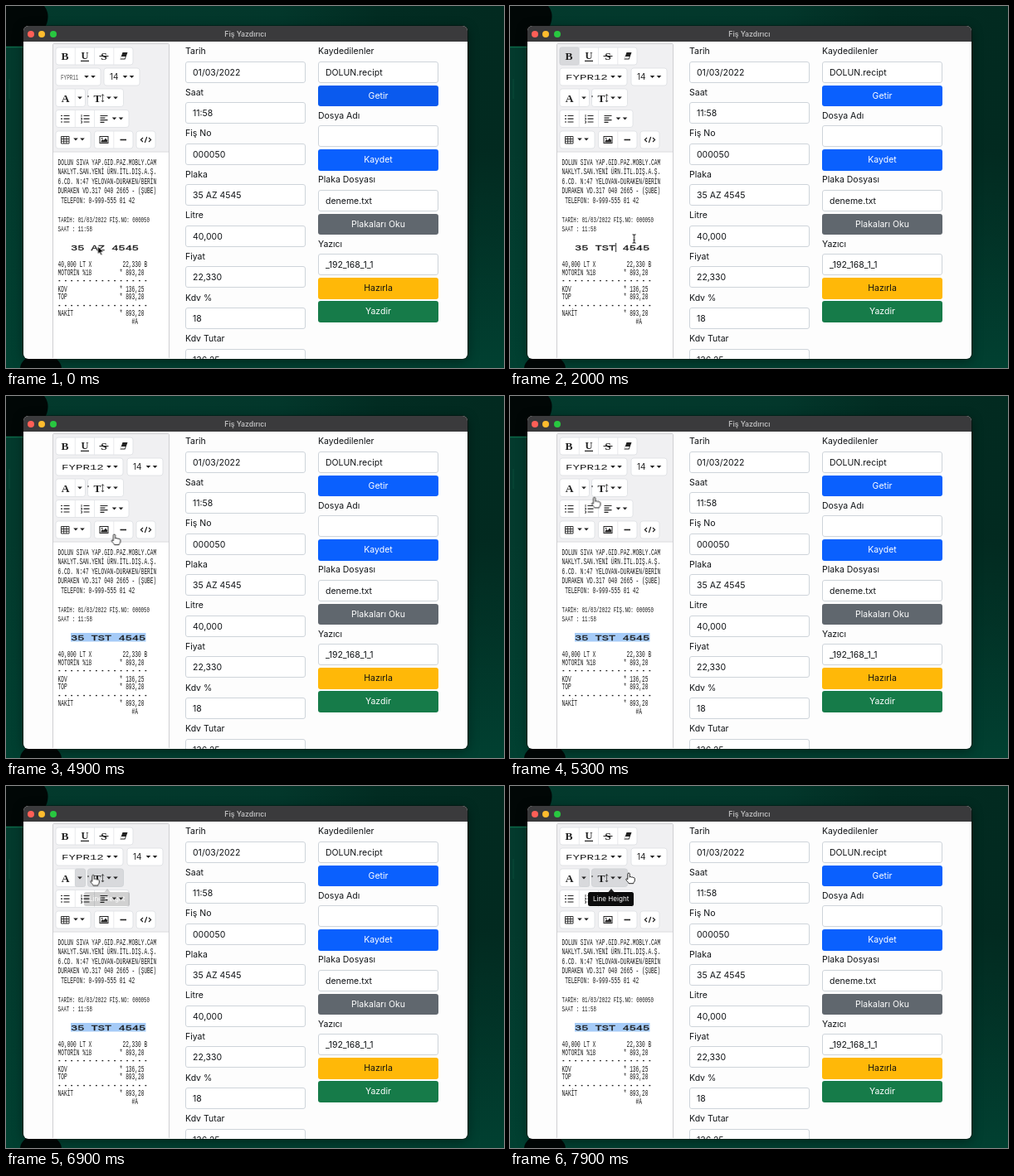
An HTML page for the animation above (8 s loop, 600 by 437 pixels).

```html
<!DOCTYPE html>
<html lang="tr">
<head>
<meta charset="utf-8">
<title>Fiş Yazdırıcı</title>
<style>
html, body { margin: 0; width: 100%; height: 100%; overflow: hidden; background: #01281f; }
body { position: relative; font: 10.5px/16px Inter, Roboto, sans-serif; color: #101316; }
svg { position: absolute; left: 0; top: 0; }

/* window and form */
.win { position: absolute; left: 21px; top: 24px; width: 535px; height: 401.5px; overflow: hidden;
  border-radius: 6px; background: #fdfdfd; box-shadow: 0 0 0 .6px #0009, 0 3px 14px #0006; }
.bar { height: 19px; line-height: 20px; text-align: center; background: #3a3a3c; color: #b9b9ba; font-size: 8.7px; font-weight: 600; }
.bar i { position: absolute; top: 5.8px; width: 8px; height: 8px; border-radius: 50%; }
.col { position: absolute; top: 22px; width: 145px; }
.col p { margin: 0; height: 20.5px; line-height: 17px; }
.in, .btn { box-sizing: border-box; border-radius: 3px; }
.in { height: 26px; padding-left: 8px; line-height: 25px; border: 1px solid #ced4da; background: #fff; }
.a .in { margin-bottom: 3.1px; }
.gap { margin-bottom: 2.6px; }
.btn { height: 25.4px; margin-top: 2.6px; line-height: 25.4px; text-align: center; color: #fff; background: #0a60fe; }
.in + .btn { margin-top: 3.1px; }

/* editor */
.box { fill: #fff; stroke: #dcdfe3; stroke-width: .8; }
.on { fill: #d8d9dc; stroke: #cfd1d5; stroke-width: .8; }
.serif { font: 700 13.5px "Liberation Serif", "Noto Serif", serif; text-anchor: middle; }
.mono { font: 10px "Liberation Mono", monospace; white-space: pre; fill: #1c1c1c; }
.mono text { white-space: pre; }
.wide { font-size: 9px; stroke: #1c1c1c; stroke-width: .25; }
.tiny { font-size: 7.4px; text-anchor: middle; fill: #111; }
.tip { font-size: 8.1px; text-anchor: middle; }
.ln { fill: none; stroke: #222; stroke-width: 1.2; }

/* timing */
.step { animation: 8s step-end infinite; }
.move { animation: 8s ease-in-out infinite; }
.fade { animation: 8s linear infinite; }
#load { animation-name: load; }
#cur { animation-name: cur; }
#sel { animation-name: sel; transform-origin: 168.5px 0; }
#caret { animation-name: caret; }
#narrow { animation-name: before; }
#broad { animation-name: after; }
#size { animation-name: size; }
#bold { animation-name: bold; }
#colorOn { animation-name: colorOn; }
#lineOn { animation-name: lineOn; }
#menu { animation-name: menu; }
#tip1 { animation-name: tip1; }
#tip2 { animation-name: tip2; }
#arrow { animation-name: arrow; }
#beam { animation-name: beam; }
#hand { animation-name: hand; }

@keyframes load { 0% { background: #0a5aee; } 2.5%, 100% { background: #0a60fe; } }
@keyframes cur {
  0% { transform: translate(110.5px, 290px); }
  6.25%, 20% { transform: translate(114px, 291px); }
  25% { transform: translate(149.5px, 281px); }
  37.5%, 42.5% { transform: translate(171px, 291px); }
  52.5%, 54% { transform: translate(78px, 291px); }
  61.25% { transform: translate(130.5px, 167px); }
  68.75%, 80% { transform: translate(93px, 109px); }
  86.25% { transform: translate(105px, 107.5px); }
  98.75%, 100% { transform: translate(143px, 105px); }
}
@keyframes sel { 0%, 42.5% { transform: scaleX(0); } 52.5%, 100% { transform: none; } }
@keyframes caret {
  0% { opacity: 0; }
  7.5% { opacity: 1; transform: translateX(41px); }
  11.25% { opacity: 1; transform: translateX(32.8px); }
  12.5% { opacity: 1; transform: translateX(24.6px); }
  15% { opacity: 1; transform: translateX(32.8px); }
  17.5% { opacity: 1; transform: translateX(41px); }
  20% { opacity: 1; transform: translateX(49.2px); }
  28.75%, 100% { opacity: 0; }
}
@keyframes before { 0% { opacity: 1; } 7.5%, 100% { opacity: 0; } }
@keyframes after { 0% { opacity: 0; } 7.5%, 100% { opacity: 1; } }
@keyframes size { 0% { transform: none; } 7.5%, 100% { transform: translateX(28px); } }
@keyframes bold { 0% { opacity: 0; } 7.5% { opacity: 1; } 52.5%, 100% { opacity: 0; } }
@keyframes colorOn { 0% { opacity: 0; } 67.5%, 100% { opacity: 1; } }
@keyframes lineOn { 0% { opacity: 0; } 85%, 100% { opacity: 1; } }
@keyframes menu { 0% { opacity: 0; } 69.4% { opacity: 1; } 80%, 100% { opacity: 0; } }
@keyframes tip1 { 0%, 68% { opacity: 0; } 69.9%, 71% { opacity: 1; } 72.9%, 100% { opacity: 0; } }
@keyframes tip2 { 0%, 85.9% { opacity: 0; } 87.8%, 100% { opacity: 1; } }
@keyframes arrow { 0% { opacity: 1; } 5%, 100% { opacity: 0; } }
@keyframes beam { 0% { opacity: 0; } 5% { opacity: 1; } 11.25% { opacity: 0; } 20% { opacity: 1; } 60%, 100% { opacity: 0; } }
@keyframes hand { 0% { opacity: 0; } 60%, 100% { opacity: 1; } }

/* typed letters take no room until shown */
.d1 { animation-name: d1; } .d2 { animation-name: d2; }
.k1 { animation-name: k1; } .k2 { animation-name: k2; } .k3 { animation-name: k3; }
@keyframes d1 { 0% { font-size: 9px; } 12.5%, 100% { font-size: 0; } }
@keyframes d2 { 0% { font-size: 9px; } 11.25%, 100% { font-size: 0; } }
@keyframes k1 { 0% { font-size: 0; } 15%, 100% { font-size: 9px; } }
@keyframes k2 { 0% { font-size: 0; } 17.5%, 100% { font-size: 9px; } }
@keyframes k3 { 0% { font-size: 0; } 20%, 100% { font-size: 9px; } }
</style>
</head>
<body>

<svg width="600" height="437">
  <defs>
    <linearGradient id="sky"><stop stop-color="#033a2d"/><stop offset=".55" stop-color="#03372b"/><stop offset=".75" stop-color="#022c22"/><stop offset="1" stop-color="#022a20"/></linearGradient>
    <linearGradient id="low" x2="0" y2="1"><stop offset=".4" stop-color="#014031" stop-opacity="0"/><stop offset="1" stop-color="#014031"/></linearGradient>
  </defs>
  <rect width="600" height="437" fill="url(#sky)"/>
  <rect width="600" height="437" fill="url(#low)"/>
  <path d="M0 0H46Q54 10 48 24L21 49H0z" fill="#010706"/>
  <path d="M0 49.500H21" stroke="#0d6a49" stroke-width="1.500"/>
  <path d="M4 88v24" stroke="#0a4a38"/>
  <ellipse cx="42" cy="438" rx="25" ry="18" fill="#010706"/>
</svg>

<div class="win">
  <div class="bar"><i style="left:5px;background:#fe5f57"></i><i style="left:18.3px;background:#febc2e"></i><i style="left:31.6px;background:#28c840"></i>Fiş Yazdırıcı</div>
  <div class="col a" style="left:195px">
    <p>Tarih</p><div class="in">01/03/2022</div>
    <p>Saat</p><div class="in">11:58</div>
    <p>Fiş No</p><div class="in">000050</div>
    <p>Plaka</p><div class="in">35 AZ 4545</div>
    <p>Litre</p><div class="in">40,000</div>
    <p>Fiyat</p><div class="in">22,330</div>
    <p>Kdv %</p><div class="in">18</div>
    <p>Kdv Tutar</p><div class="in">136,25</div>
  </div>
  <div class="col" style="left:355px">
    <p>Kaydedilenler</p><div class="in">DOLUN.recipt</div><div id="load" class="btn gap fade">Getir</div>
    <p>Dosya Adı</p><div class="in"></div><div class="btn gap">Kaydet</div>
    <p>Plaka Dosyası</p><div class="in">deneme.txt</div><div class="btn gap" style="background:#60676e">Plakaları Oku</div>
    <p>Yazıcı</p><div class="in">_192_168_1_1</div>
    <div class="btn" style="background:#ffb808;color:#111">Hazırla</div>
    <div class="btn" style="background:#167b49">Yazdir</div>
  </div>
</div>

<svg width="600" height="437" fill="#222">
  <defs>
    <path id="dn" d="M-2.8-1.4h5.6L0 1.6z"/>
    <g id="dn2"><use href="#dn"/><use href="#dn" x="8"/></g>
    <linearGradient id="dark"><stop/><stop offset="1" stop-color="#505050"/></linearGradient>
  </defs>

  <path d="M56.5 425V47q0-1.500 1.500-1.500H195q1.500 0 1.500 1.500V425" fill="#fff" stroke="#cfcfd2"/>
  <path d="M57 46H196V175.500H57z" fill="#f0f0f2"/>
  <path d="M57 176H196" stroke="#d6d6d9"/>

  <!-- row 1 -->
  <rect class="box" x="60" y="50" width="93" height="21" rx="3"/>
  <path d="M83.300 50v21M106.500 50v21M129.800 50v21" stroke="#e3e5e8" stroke-width=".8"/>
  <rect id="bold" class="on step" x="60" y="50" width="23" height="21" rx="2"/>
  <g class="serif">
    <text x="71" y="65">B</text><text x="95" y="64" font-size="12.500">U</text><text x="118" y="65">S</text>
  </g>
  <path class="ln" d="M90 66.300h10M112.500 60.500h11"/>
  <path d="M140.500 56h6l-3 8.500h-6z"/><path d="M138.800 61h5l-.9 2.500h-5z" fill="#fff"/>

  <!-- row 2 -->
  <g id="narrow" class="step">
    <rect class="box" x="60" y="75" width="54" height="21" rx="3"/>
    <text class="mono" transform="translate(66 88.500) scale(.62 1)" style="font-size:9.600px;fill:#555">FYPR11</text>
    <use href="#dn2" x="97" y="85.500"/>
  </g>
  <g id="broad" class="step">
    <rect class="box" x="60" y="75" width="81" height="21" rx="3"/>
    <text class="mono" transform="translate(67 88.500) scale(1.520 1)" style="font-size:9.300px">FYPR12</text>
    <use href="#dn2" x="124" y="85.500"/>
  </g>
  <g id="size" class="step">
    <rect class="box" x="118" y="75" width="43" height="21" rx="3"/>
    <text x="125" y="89" font-size="10">14</text><use href="#dn2" x="143.500" y="85.500"/>
  </g>

  <!-- row 3 -->
  <rect class="box" x="60" y="100" width="35.500" height="21.500" rx="3"/>
  <path d="M83.300 100v21.500" stroke="#e3e5e8" stroke-width=".8"/>
  <rect id="colorOn" class="on step" x="83.500" y="100" width="12" height="21.500" rx="2"/>
  <text class="serif" x="71.500" y="116">A</text><use href="#dn" x="89" y="111"/>
  <rect class="box" x="98.500" y="100" width="43" height="21.500" rx="3"/>
  <rect id="lineOn" class="on step" x="98.500" y="100" width="43" height="21.500" rx="3"/>
  <path d="M98 108.500h2l-1 2z"/>
  <text class="serif" x="110" y="115.500">T</text>
  <path d="M116.500 107v8.500M115 108.500l1.500-2 1.500 2M115 114l1.500 2 1.500-2" class="ln" style="stroke-width:.7"/>
  <use href="#dn2" x="124" y="111"/>

  <!-- row 4 -->
  <rect class="box" x="60" y="125.500" width="88" height="21" rx="3"/>
  <path d="M83.300 125.500v21M106.500 125.500v21" stroke="#e3e5e8" stroke-width=".8"/>
  <path class="ln" d="M66 132.500h2m1.500 0h7M66 136.200h2m1.500 0h7M66 140h2m1.500 0h7M93.500 132.500h7m-7 3.700h7m-7 3.800h7M113.500 132.500h9m-9 2.600h6m-6 2.600h9m-9 2.600h5"/>
  <path d="M91 131v3M90 135.300h1.500v1.800H90M90 139h1.500v2.200H90" class="ln" style="stroke-width:.8"/>
  <use href="#dn2" x="130.500" y="136"/>

  <!-- row 5 -->
  <rect class="box" x="60" y="151" width="42" height="21" rx="3"/>
  <path class="ln" d="M66.500 157.500h9.500v8.500h-9.500zM66.500 160.500H76M66.500 163.200H76M69.700 157.500V166M72.900 157.500V166" style="stroke-width:.9"/>
  <use href="#dn2" x="84" y="161"/>
  <rect class="box" x="106.500" y="151" width="46.500" height="21" rx="3"/>
  <path d="M129.800 151v21" stroke="#e3e5e8" stroke-width=".8"/>
  <rect class="ln" x="113" y="157.500" width="10" height="8" style="stroke-width:1"/>
  <path d="M114.500 164.500v-1.500l2-2 1.300 1.300 2.200-2.700 2 2.400v2.500z"/><circle cx="115.700" cy="159.800" r=".9"/>
  <path class="ln" d="M137.500 161.500h7.500" style="stroke-width:1.600"/>
  <rect class="box" x="157" y="151" width="23" height="21" rx="3"/>
  <path class="ln" d="M165 159l-2.600 2.500 2.600 2.500M172 159l2.600 2.500-2.600 2.500M169.700 158l-2.400 7"/>

  <!-- receipt -->
  <g class="mono" transform="translate(62.500 0) scale(.62 1)">
    <text y="192">DOLUN SIVA YAP.GID.PAZ.MOBLY.CAM</text>
    <text y="203.500">NAKLYT.SAN.YENİ ÜRN.İTL.DIŞ.A.Ş.</text>
    <text y="215">6.CD. N:47 YELOVAN-DURAKEN/BERİN</text>
    <text y="226.500">DURAKEN VD.317 040 2665 - (ŞUBE)</text>
    <text y="238"> TELEFON: 0-999-555 01 42</text>
    <g font-size="9.300"><text y="261">TARİH: 01/03/2022 FİŞ.NO: 000050</text>
    <text y="272.500">SAAT : 11:58</text></g>
    <text y="315">40,000 LT X          22,330 B</text>
    <text y="325">MOTORİN %18         * 893,20</text>
    <text y="334.500" font-weight="700">- - - - - - - - - - - - - - -</text>
    <text y="345">KDV                 * 136,25</text>
    <text y="354.500">TOP                 * 893,20</text>
    <text y="364.500" font-weight="700">- - - - - - - - - - - - - - -</text>
    <text y="374.500">NAKİT               * 893,20</text>
    <text y="384">                        #A</text>
  </g>
  <rect id="sel" class="move" x="78" y="286" width="90.500" height="10.500" fill="#a5cbf8"/>
  <text class="mono wide" transform="translate(78 294.500) scale(1.520 1)">35 <tspan class="step d1">A</tspan><tspan class="step d2">Z</tspan><tspan class="step k1">T</tspan><tspan class="step k2">S</tspan><tspan class="step k3">T</tspan> 4545</text>
  <path id="caret" class="step" d="M78.300 286v11" stroke="#111"/>

  <!-- colour menu -->
  <g id="menu" class="step">
    <rect x="60" y="123" width="123" height="86" rx="3" fill="#0001"/>
    <rect x="61" y="122.500" width="120" height="84" rx="2" fill="#fff" stroke="#d0d0d2" stroke-width=".8"/>
    <path d="M67 139.500H173" stroke="#ddd" stroke-width=".8"/>
    <rect x="68" y="144" width="106" height="12" rx="2" fill="#f2f2f4"/>
    <rect x="68" y="175" width="106" height="11.500" rx="2" fill="#f2f2f4"/>
    <g class="tiny"><text x="120.500" y="135.800">Text Color</text><text x="122" y="152.600">Reset to default</text><text x="122" y="183.300">Select</text></g>
    <rect x="67" y="158" width="106.500" height="13.500" fill="url(#dark)"/>
    <path d="M67 195.500H173.500" stroke="#e4e4e6" stroke-width="13"/>
    <path d="M67.500 195.500H173.500" stroke="#fff" stroke-width="12" stroke-dasharray="12.500 .8"/>
  </g>

  <!-- tooltips -->
  <g id="tip1" class="tip fade">
    <path d="M90 124l3.500 4h-7z"/><rect x="63" y="128" width="54" height="17" rx="2.500" fill="#111"/>
    <text x="90" y="139.400" fill="#fff">More Color</text>
  </g>
  <g id="tip2" class="tip fade">
    <path d="M122 124l3.500 4h-7z"/><rect x="94" y="128" width="55" height="17" rx="2.500" fill="#0d0d0d"/>
    <text x="121.700" y="139.400" fill="#fff">Line Height</text>
  </g>

  <!-- pointer -->
  <g id="cur" class="move">
    <path id="arrow" class="step" d="M0 0V9.500l2.200-2 1.500 3.500 1.700-.7-1.500-3.400h3z" fill="#0a0a0a" stroke="#fff" stroke-width=".7"/>
    <path id="beam" class="step" d="M-2-5.200Q0-5.200 0-4Q0-5.200 2-5.200M0-4V4M-2 5.200Q0 5.200 0 4Q0 5.200 2 5.200M-1 1.500h2" fill="none" stroke="#111" stroke-width="1.100"/>
    <path id="hand" class="step" d="M-1.200 1.200c0-1.600 2.400-1.600 2.400 0v4c.4-.9 2-.8 2.200.1 .6-.7 1.900-.4 2 .4 .8-.5 1.900 0 1.900 1v2.200c0 2-1.600 2-1.600 3.800h-5.600c-.4-1.800-2.600-2.800-3.200-4.600-.4-1.200 1-1.600 1.900-.3z" fill="#fff" stroke="#111" stroke-width=".9"/>
  </g>
</svg>
</body>
</html>
```
